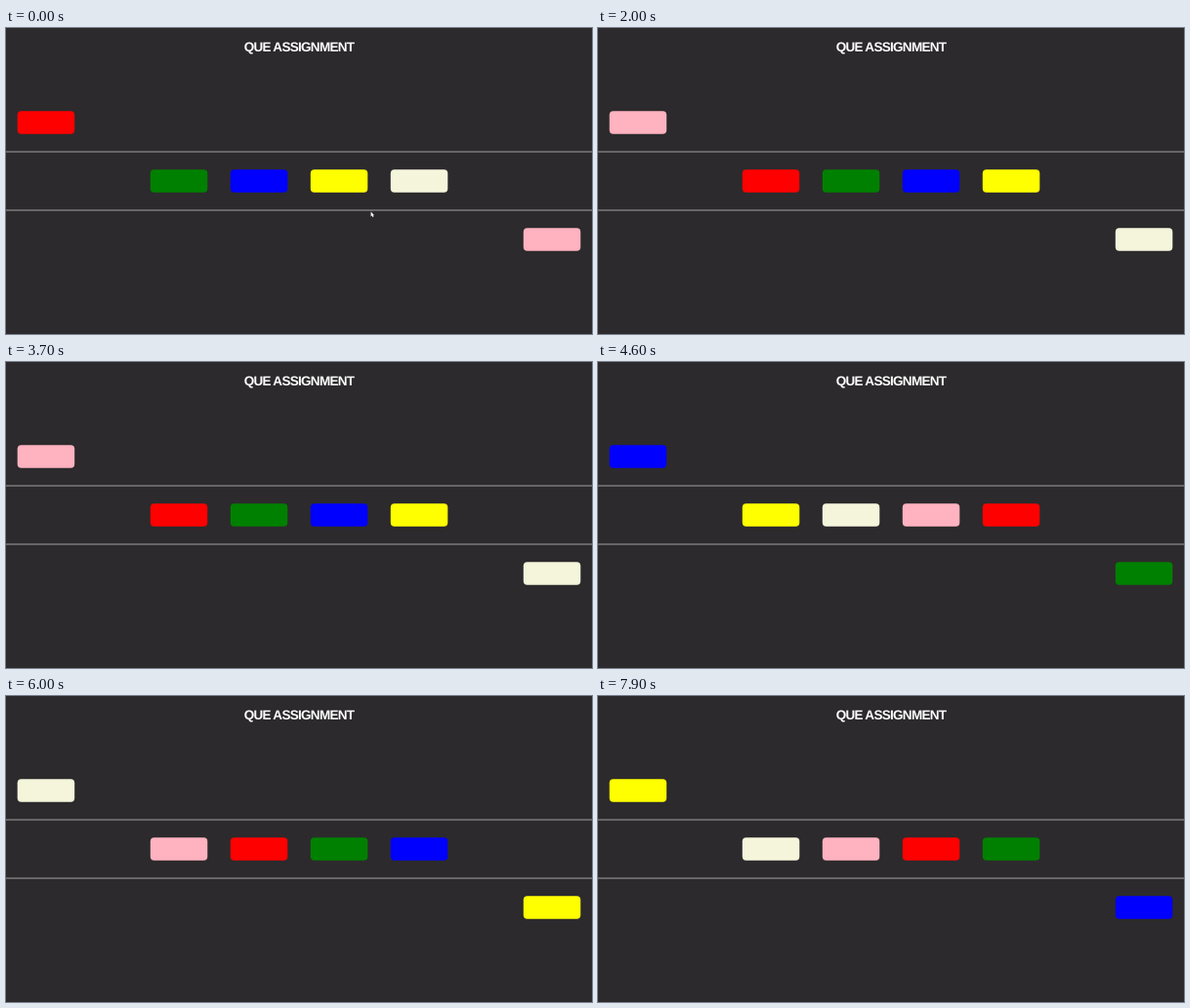
These frames come from a looping animation (600 by 314 pixels, 8 s). An HTML page:

```html
<!DOCTYPE html>
<html lang="en">
<head>
<meta charset="utf-8">
<title>Que assignment</title>
<style>
  html, body { margin: 0; width: 100%; height: 100%; overflow: hidden; background: #2c2a2c; }
  svg { display: block; width: 100%; height: 100%; }
  text {
    font: 700 13.5px "Liberation Sans", Arial, sans-serif;
    letter-spacing: -.7px;
    fill: #fff;
    text-rendering: geometricPrecision;
  }
  rect { width: 58.5px; height: 23.5px; rx: 4px; }
</style>
</head>
<body>
<svg viewBox="0 0 600 314">
  <text x="300" y="24" text-anchor="middle">QUE ASSIGNMENT</text>
  <path d="M0 127H600M0 187H600" stroke="#a3a2a2"/>
  <g id="boxes"></g>
  <path id="cursor" d="M0 0V5L1.2 4L2 5.6L2.8 5.2L2.1 3.7H3.5Z" fill="#fff"/>
</svg>
<script>
  const LOOP = 8000, STEP = 300, FIRST_STEP = 100;
  const COLORS = ['red', 'green', 'blue', 'yellow', 'beige', '#ffb2bf'];
  const count = COLORS.length, last = count - 1;
  const boxGroup = document.getElementById('boxes');
  const cursor = document.getElementById('cursor');

  // One box at the left on top, a centred row, one box at the right below.
  const boxes = COLORS.map((_, i) => {
    const box = document.createElementNS('http://www.w3.org/2000/svg', 'rect');
    const row = i === 0 ? 0 : i === last ? 2 : 1;
    box.setAttribute('x', row === 0 ? 11.7 : row === 2 ? 529.8 : 65.8 + 82 * i);
    box.setAttribute('y', 85.3 + 60 * row);
    return boxGroup.appendChild(box);
  });

  function draw(time) {
    // Each turn moves the last colour to the front of the queue.
    const turns = Math.floor((time - FIRST_STEP) / STEP) + 1;
    boxes.forEach((box, i) => {
      box.setAttribute('fill', COLORS[(i + turns * last) % count]);
    });

    // The pointer speeds up until it has left through the bottom edge.
    const p = Math.min(1, Math.max(0, (time - 400) / 600));
    cursor.setAttribute('transform', `translate(${373.6 + 4 * p} ${188.6 + 131 * p ** 1.5})`);
  }

  const start = performance.now();
  function tick() {
    draw((performance.now() - start) % LOOP);
    requestAnimationFrame(tick);
  }
  tick();
</script>
</body>
</html>
```
